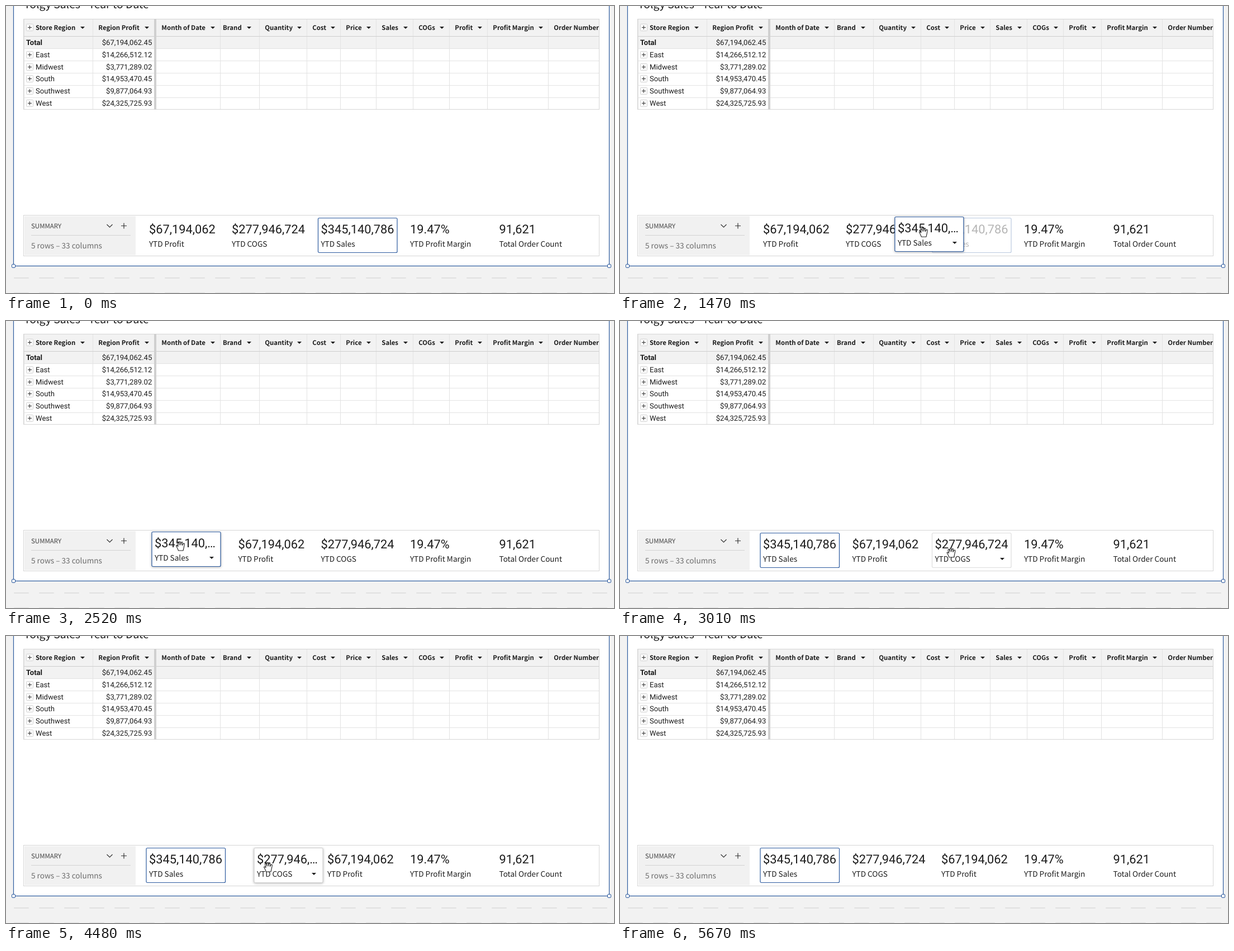
Recreate the animation shown at these times as an HTML page. Size 1088x515 px, loop 6370 ms.

```html
<!DOCTYPE html>
<html lang="en">
<head>
<meta charset="utf-8">
<title>Sales summary</title>
<style>
html, body { margin: 0; width: 100%; height: 100%; overflow: hidden; background: #f2f2f2; }
svg { display: block; width: 1088px; height: 515px; }
text { font-family: "Noto Sans CJK JP", "Noto Sans CJK SC", "Noto Sans CJK", sans-serif; fill: #1c1c1c; white-space: pre; text-rendering: geometricPrecision; }
.title { font-size: 19.4px; }
.head { font-size: 11.4px; font-weight: 600; }
.cell { font: 13.1px Roboto, sans-serif; }
.total { font-weight: 700; }
.num { text-anchor: end; }
.caps { font-size: 11.5px; fill: #444; }
.rows { font-size: 13.6px; fill: #6c6c6c; }
.value { font: 21.8px Roboto, sans-serif; }
.label { font-size: 13.6px; }
.float { filter: drop-shadow(0 1px 2px rgba(0, 0, 0, .3)); }
</style>
</head>
<body>
<svg id="stage" viewBox="0 0 1088 515">
  <clipPath id="tableClip"><rect x="31" y="22" width="1031" height="165"/></clipPath>
</svg>
<script>
const LOOP = 6370, STEP = 70, SLIDE = 140;
const BLUE = '#2c5a9e', LINE = '#e3e3e3', EDGE = '#d6d6d6', INK = '#1c1c1c';
const stage = document.getElementById('stage');

function add(parent, tag, attrs, text) {
  const el = document.createElementNS('http://www.w3.org/2000/svg', tag);
  for (const k in attrs) el.setAttribute(k, attrs[k]);
  if (text) el.textContent = text;
  parent.appendChild(el);
  return el;
}
const box = (p, x, y, width, height, fill, more) => add(p, 'rect', { x, y, width, height, fill, ...more });
const write = (p, x, y, cls, s) => add(p, 'text', { x, y, class: cls }, s);
const caret = (p, x, y) => add(p, 'path', { d: `M${x - 4} ${y - 2}h8l-4 4z`, fill: INK });
const stroke = (p, d, color, w) => add(p, 'path', { d, fill: 'none', stroke: color, 'stroke-width': w });

function drawPage() {
  for (const y of [487, 514])
    for (let x = 14; x < 1088; x += 45) box(stage, x, y, 27, 2, '#e0e0e0', { rx: 1 });
  box(stage, 13.5, -5, 1066, 471.5, '#fff', { stroke: BLUE, 'stroke-width': 1.2 });
  for (const x of [10.5, 1076.5]) box(stage, x, 463.5, 6, 6, '#fff', { stroke: BLUE, rx: 1.5 });
  write(stage, 32, 4, 'title', 'Tolgy Sales - Year to Date');
}

function expander(p, y) {
  box(p, 36.5, y - 6, 12, 12, '#fff', { stroke: '#cfcfcf', rx: 1 });
  stroke(p, `M39 ${y}h7M42.5 ${y - 3.5}v7`, '#333', 1);
}

function drawTable() {
  const g = add(stage, 'g', { 'clip-path': 'url(#tableClip)' });
  box(g, 31, 23, 1031, 53, '#f2f2f2');
  for (let y = 76; y < 186; y += 22) box(g, 32, y, 1030, 1, LINE);

  // Name and left edge; the nameless column is the freeze bar.
  const columns = [
    ['Store Region', 32], ['Region Profit', 155], ['', 265], ['Month of Date', 268],
    ['Brand', 383], ['Quantity', 453], ['Cost', 538], ['Price', 598], ['Sales', 662],
    ['COGs', 728], ['Profit', 793], ['Profit Margin', 861], ['Order Number', 970]
  ];
  columns.forEach(([name, left], i) => {
    const next = columns[i + 1], isText = name === 'Brand' || i === 0;
    box(g, left, 23, 1, 163, LINE);
    if (!name) return;
    write(g, left + (i === 0 ? 21 : isText ? 5 : 10.3), 43, 'head', name);
    if (next) caret(g, next[1] - (isText ? 18 : 13), 39);
  });
  expander(g, 38.5);
  box(g, 31, 54, 1031, 1, '#cecece');
  box(g, 31.5, 23.5, 1030, 162, 'none', { stroke: EDGE });
  box(g, 265, 23, 4, 163, '#d0d0d0');

  const rows = [
    ['Total', '$67,194,062.45'], ['East', '$14,266,512.12'], ['Midwest', '$3,771,289.02'],
    ['South', '$14,953,470.45'], ['Southwest', '$9,877,064.93'], ['West', '$24,325,725.93']
  ];
  rows.forEach(([name, sum], i) => {
    const y = 69.7 + 21.9 * i;
    write(g, i ? 53 : 36, y, i ? 'cell' : 'cell total', name);
    write(g, 261.3, y, 'cell num', sum);
    if (i) expander(g, Math.round(y - 5) + .5);
  });
}

function drawSummary() {
  box(stage, 31.5, 375.5, 1030, 73, '#fff', { stroke: EDGE });
  box(stage, 33, 377, 199, 70, '#f1f1f1');
  write(stage, 45, 398.7, 'caps', 'SUMMARY');
  stroke(stage, 'M180.5 392l5 5 5-5M206 394.5h10M211 389.5v10', '#333', 1.2);
  box(stage, 45, 411, 178, 1, '#d3d3d3');
  write(stage, 45, 434.5, 'rows', '5 rows – 33 columns');
}

// A card's origin is its text's left edge; its frame starts 5 px before that.
function makeCard(value, label, w, cls) {
  const g = add(stage, 'g', cls ? { class: cls } : {});
  const frame = box(g, -5, 380.5, w, 62, cls ? '#fff' : 'none', { rx: 2, 'stroke-width': 1.2 });
  write(g, 0, 408, 'value', value);
  write(g, 0, 432, 'label', label);
  return { g, frame, w, arrow: caret(g, w - 21, 427) };
}
const show = (el, on) => el.setAttribute('display', on ? 'inline' : 'none');
const move = (el, x, y) => el.setAttribute('transform', `translate(${x} ${y})`);

drawPage();
drawTable();
drawSummary();

const WIDE = 141.5;
const specs = {
  profit: ['$67,194,062', 'YTD Profit', 130],
  cogs: ['$277,946,724', 'YTD COGS', WIDE],
  margin: ['19.47%', 'YTD Profit Margin', WIDE],
  orders: ['91,621', 'Total Order Count', WIDE],
  sales: ['$345,140,786', 'YTD Sales', WIDE]
};
const cards = {};
for (const id in specs) cards[id] = makeCard(...specs[id]);

// The first three slots change order while a card is held.
const orders = [
  { at: -LOOP, ids: ['profit', 'cogs', 'sales'] },
  { at: 1470, ids: ['profit', 'sales', 'cogs'] },
  { at: 1648, ids: ['sales', 'profit', 'cogs'] },
  { at: 3500, ids: ['sales', 'cogs', 'profit'] }
];

const drags = [
  { id: 'sales', from: 1400, to: 2520, grip: 46.5, dy: -2, color: BLUE },
  { id: 'cogs', from: 3290, to: 4480, grip: 20.5, dy: 0, color: '#d2d2d2' }
];
for (const d of drags) {
  const [value, label] = specs[d.id];
  d.card = makeCard(value.slice(0, -3) + '…', label, 123, 'float');
  d.card.frame.setAttribute('stroke', d.color);
}

// Cursor moves: begin, end, and where it comes to rest.
const home = [582, 492];
const moves = [
  [350, 910, 618, 422], [980, 1260, 619, 407], [1330, 1960, 312.5, 404], [2520, 3010, 593, 416],
  [3220, 3920, 480, 414], [3920, 4130, 469.5, 415], [4480, 4900, 800, 415], [5180, 5670, 542, 514]
];

const clamp = v => Math.min(1, Math.max(0, v));
const mix = (a, b, p) => a + (b - a) * p;
const ease = p => 1 - (1 - p * p * (3 - 2 * p)) ** 2.1;

function cursorAt(t) {
  let [x, y] = home;
  for (const [begin, end, tx, ty] of moves) {
    const p = ease(clamp((t - begin) / (end - begin)));
    x = mix(x, tx, p);
    y = mix(y, ty, p);
  }
  return [x, y];
}

function slotX(id, ids) {
  let x = 256;
  for (const other of [...ids, 'margin', 'orders']) {
    if (other === id) return x;
    x += cards[other].w + 18;
  }
}

// The held card leads; its neighbours follow one step later.
function cardX(id, t, held) {
  const local = held ? t : t - STEP;
  return orders.reduce((x, o) => mix(x, slotX(id, o.ids), clamp((local - o.at) / SLIDE)), 0);
}

const shapes = {
  arrow: 'M-5-8V6L-1.8 3 .5 8 2.8 7 .6 2H5z',
  point: 'M-3.5 8Q-4 5-7 1-6-1-3.2 1.5V-6.5Q-2-9-.7-6.5V-1.5Q1-3 2-1.2 3.5-2 4.5-.4 6-1 6.8 1 6.8 5 5.3 8z',
  hand: 'M-4 8Q-5 5-8-.5-7-2-4.5.5L-6-5Q-5-8-3.5-5.5L-2.5-2V-7Q-1-9 0-7L.3-2 1.2-6.5Q3-8.5 3.5-6L3-1.5 4.8-4.5Q7-6 6.8-3.2 6 2 4.5 8z'
};
const cursor = add(stage, 'path', { fill: '#fff', stroke: '#222', 'stroke-width': 1.1, 'stroke-linejoin': 'round' });

function render(t) {
  const [cx, cy] = cursorAt(t);
  const present = t >= 420 && t < 5670;
  const drag = drags.find(d => t >= d.from && t <= d.to);
  let over = false;

  for (const id in cards) {
    const c = cards[id], held = drag && drag.id === id;
    const x = cardX(id, t, held);
    const inside = present && cx > x - 5 && cx < x - 5 + c.w && cy > 380 && cy < 443;
    const hover = inside && !drag && t >= 1120;
    over = over || inside;
    move(c.g, x, 0);
    show(c.g, !(held && t === drag.to));
    show(c.arrow, hover);
    c.g.setAttribute('opacity', held ? .32 : 1);
    c.frame.setAttribute('stroke', id === 'sales' ? BLUE : hover ? '#dcdcdc' : 'none');
  }
  for (const d of drags) {
    show(d.card.g, d === drag);
    if (d === drag) move(d.card.g, cx - d.grip, d.dy);
  }

  const kind = drag ? 'hand' : !over ? 'arrow' : t < 1120 ? 'point' : 'hand';
  show(cursor, present);
  cursor.setAttribute('d', shapes[kind]);
  move(cursor, cx, cy);
}

const start = performance.now();
function tick() {
  const t = (performance.now() - start) % LOOP;
  render(Math.floor(t / STEP) * STEP);
  requestAnimationFrame(tick);
}
tick();
</script>
</body>
</html>
```
